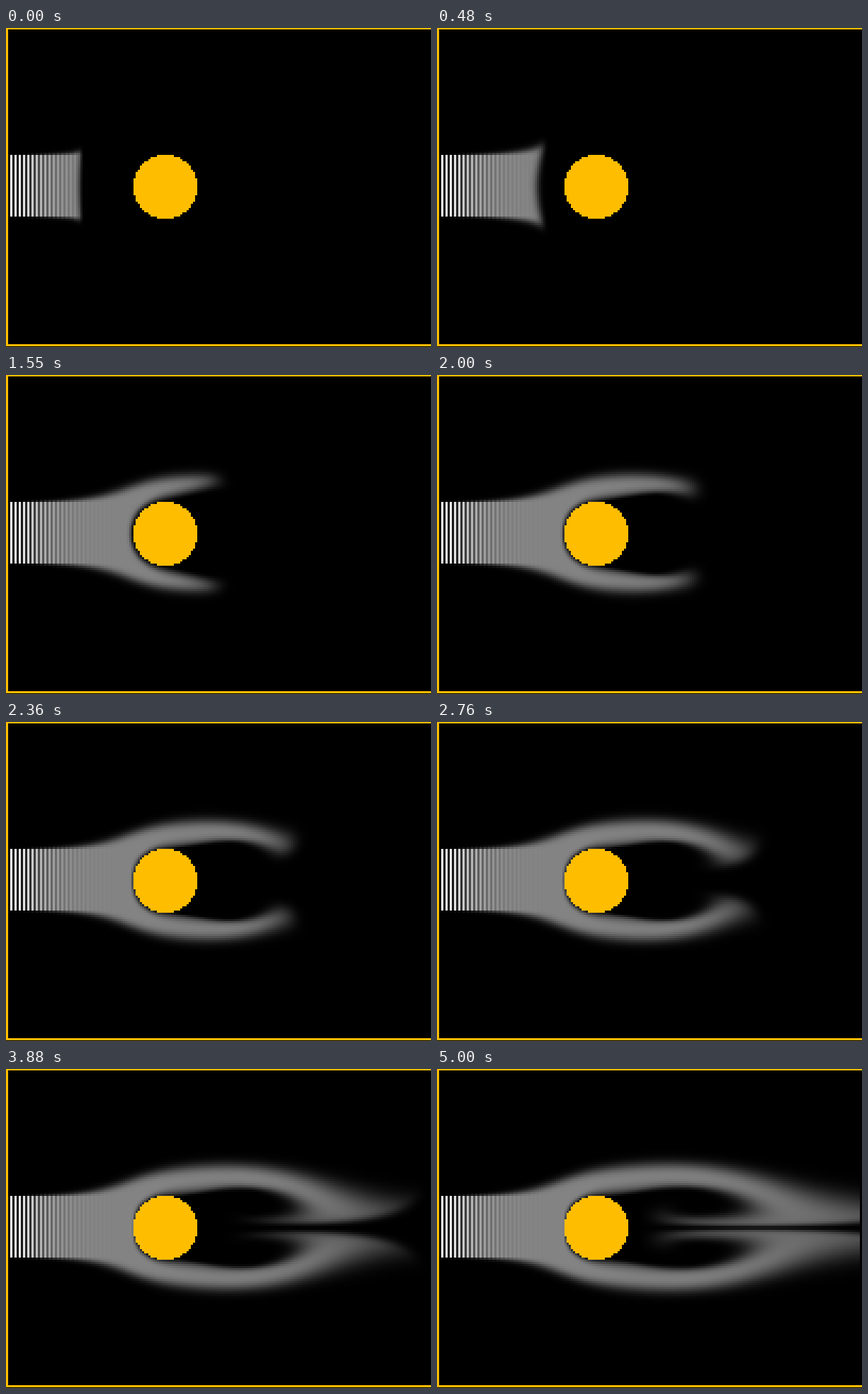
These frames come from a looping animation (600x450 px, 5.03 s). An HTML page with a canvas:

```html
<!DOCTYPE html>
<html lang="en">
<head>
<meta charset="utf-8">
<title>Smoke flowing past a cylinder</title>
<style>
html, body { margin: 0; width: 100%; height: 100%; overflow: hidden; background: #000; }
canvas { display: block; width: 600px; height: 450px; }
</style>
</head>
<body>
<canvas id="stage" width="600" height="450"></canvas>
<script>
const LOOP = 5030, STEP_MS = 28.5, LEAD_STEPS = 33;
const CELL = 3, NX = 200, NY = 75, W = NX + 1, SIZE = W * (NY + 1);
const CENTER_X = 75, RADIUS = 15, WALL = NY - 1;
const VISCOSITY = 0.1, GRAY = 131, YELLOW = [255, 189, 0];

// The flow is symmetric: only one half is solved, row 0 lies on the axis.
const field = () => new Float32Array(SIZE);
let u = field(), v = field();
const smoke = [{ rows: 15, d: field() }, { rows: 14, d: field() }];
const openU = new Uint8Array(SIZE), openV = new Uint8Array(SIZE), openCell = new Uint8Array(SIZE);

const inDisc = (i, j) => (i + 0.5 - CENTER_X) ** 2 + (j + 0.5) ** 2 < RADIUS ** 2;
const isSolid = (i, j) => j >= WALL || inDisc(i, j);

function setup() {
  for (let j = 0; j < WALL; j++) {
    for (let i = 0; i <= NX; i++) {
      const k = j * W + i;
      const solid = isSolid(i, j);
      openU[k] = i > 1 && !solid && !isSolid(i - 1, j) ? 1 : 0;
      openV[k] = i > 0 && i < NX && j > 0 && !solid && !isSolid(i, j - 1) ? 1 : 0;
      openCell[k] = i > 0 && i < NX && !solid ? 1 : 0;
      if (i < 2 || openU[k]) u[k] = 1;
    }
  }
  feed();
  project(1000, 1.97);
}

function feed() {
  for (const { rows, d } of smoke) {
    for (let j = 0; j < rows; j++) d.fill(1, j * W, j * W + 3);
  }
}

function sample(f, x, y) {
  x = Math.min(Math.max(x, 0), NX);
  y = Math.min(Math.max(y, 0), NY);
  const i = Math.min(x | 0, NX - 1), j = Math.min(y | 0, NY - 1);
  const a = x - i, b = y - j, k = j * W + i;
  return (1 - b) * ((1 - a) * f[k] + a * f[k + 1])
    + b * ((1 - a) * f[k + W] + a * f[k + W + 1]);
}

// A copy of f in which rule(k, i, j) gives the value of every open place.
function update(f, mask, rule) {
  const out = f.slice();
  for (let j = 0; j < WALL; j++) {
    for (let i = 1; i <= NX; i++) {
      const k = j * W + i;
      if (mask[k]) out[k] = rule(k, i, j);
    }
  }
  return out;
}

const carry = (f, mask, velX, velY) =>
  update(f, mask, (k, i, j) => sample(f, i - velX(k), j - velY(k)));

const diffuse = (f, mask) => update(f, mask, (k, i, j) => {
  const right = i < NX ? f[k + 1] : f[k];
  const below = j ? f[k - W] : f[k];
  return f[k] + VISCOSITY * (f[k - 1] + right + below + f[k + W] - 4 * f[k]);
});

// Remove divergence by over-relaxed sweeps over the open faces.
function project(sweeps, relax) {
  for (let n = 0; n < sweeps; n++) {
    for (let j = 0; j < WALL; j++) {
      for (let i = 1, k = j * W + 1; i < NX; i++, k++) {
        if (!openCell[k]) continue;
        const l = openU[k], r = openU[k + 1], b = openV[k], t = openV[k + W];
        const open = l + r + b + t;
        if (!open) continue;
        const push = -relax * (u[k + 1] - u[k] + v[k + W] - v[k]) / open;
        u[k] -= l * push;
        u[k + 1] += r * push;
        v[k] -= b * push;
        v[k + W] += t * push;
      }
    }
  }
}

function step() {
  // Diffusing before carrying keeps both parts stable.
  const softU = diffuse(u, openU), softV = diffuse(v, openV);
  const newU = carry(softU, openU,
    k => u[k], k => (v[k - 1] + v[k] + v[k + W - 1] + v[k + W]) / 4);
  const newV = carry(softV, openV,
    k => (u[k] + u[k + 1] + u[k - W] + u[k - W + 1]) / 4, k => v[k]);
  u = newU;
  v = newV;
  project(40, 1.9);
  for (const half of smoke) {
    half.d = carry(half.d, openCell, k => (u[k] + u[k + 1]) / 2, k => (v[k] + v[k + W]) / 2);
  }
  feed();
}

// Alternating bands near the inlet fade into an even gray.
function tone(i) {
  const fade = Math.exp(-Math.pow((i - 2) / 15, 1.5));
  return GRAY + (i % 2 ? -GRAY : 255 - GRAY) * fade;
}

function paint() {
  const image = new ImageData(NX, 2 * NY);
  const px = image.data;
  for (let row = 0; row < 2 * NY; row++) {
    const top = row < NY;
    const j = top ? NY - 1 - row : row - NY;
    const d = smoke[top ? 0 : 1].d;
    for (let i = 0; i < NX; i++) {
      const p = (row * NX + i) * 4;
      const yellow = i === 0 || j === WALL || inDisc(i, j);
      const gray = i > 1 && i < NX - 1 ? d[j * W + i] * tone(i) : 0;
      for (let c = 0; c < 3; c++) px[p + c] = yellow ? YELLOW[c] : gray;
      px[p + 3] = 255;
    }
  }
  return image;
}

const ctx = document.getElementById("stage").getContext("2d");
const grid = document.createElement("canvas");
grid.width = NX;
grid.height = 2 * NY;
const gridCtx = grid.getContext("2d");
const pictures = [];

function draw(time) {
  const n = Math.floor((time % LOOP) / STEP_MS);
  while (pictures.length <= n) {
    if (pictures.length) step();
    pictures.push(paint());
  }
  gridCtx.putImageData(pictures[n], 0, 0);
  ctx.fillStyle = "#000";
  ctx.fillRect(0, 0, 600, 450);
  ctx.imageSmoothingEnabled = false;
  ctx.drawImage(grid, 0, -1, NX * CELL, 2 * NY * CELL);
}

setup();
for (let n = 0; n < LEAD_STEPS; n++) step();
draw(0);

let start = null;
function tick(now) {
  if (start === null) start = now;
  draw(now - start);
  requestAnimationFrame(tick);
}
requestAnimationFrame(tick);
</script>
</body>
</html>
```
